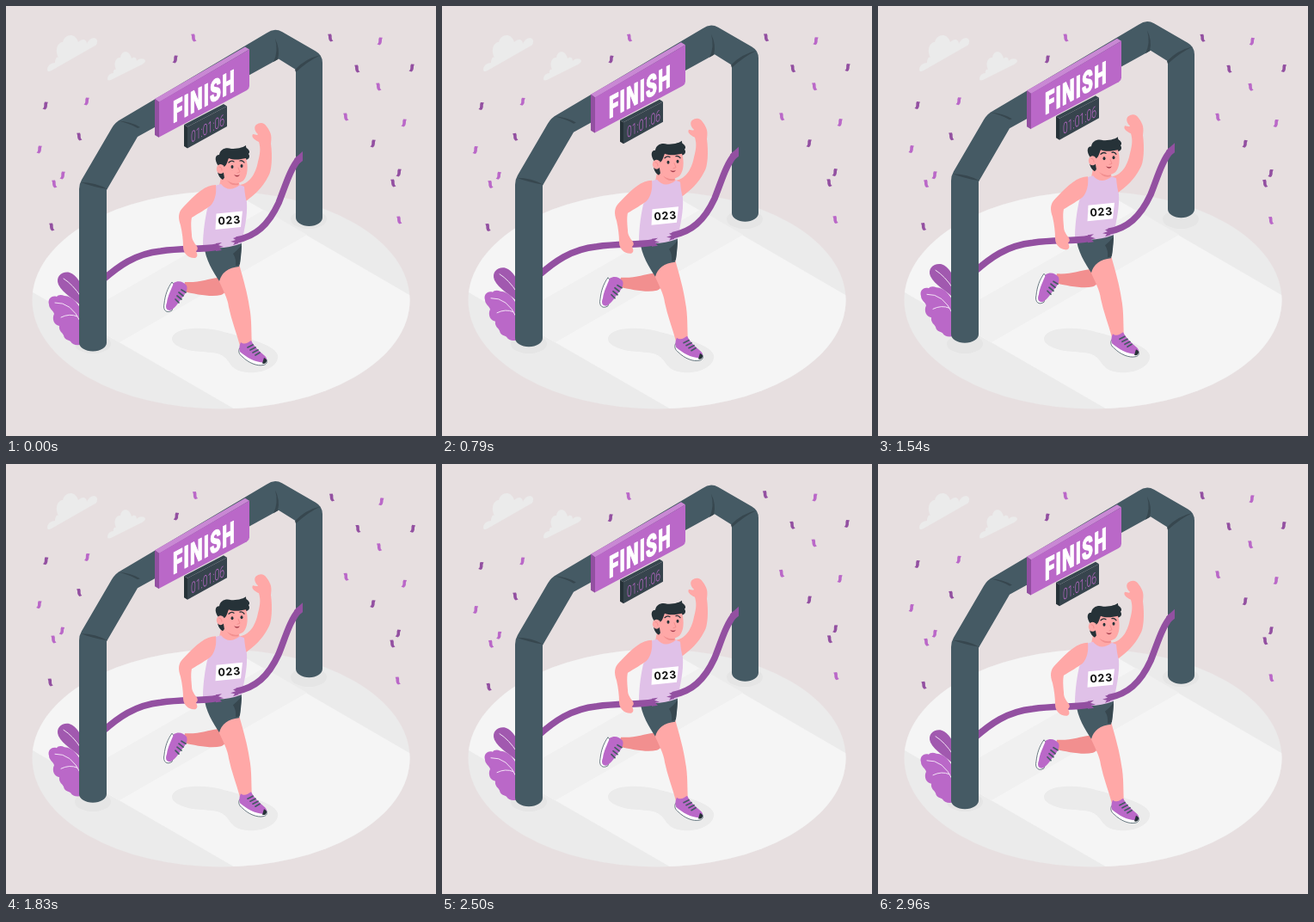
An HTML page for the animation above (3 s loop, 500x500 px).

```html
<!DOCTYPE html>
<html lang="en">
<head>
<meta charset="utf-8">
<title>Finish line</title>
<style>
html, body { margin: 0; width: 100%; height: 100%; overflow: hidden; background: #e7dfe0; }
svg { display: block; width: 100%; height: 100%; }
.skin { fill: #ffa8a7; }
.steel { fill: #455a64; }
.dark { fill: #37474f; }
.ink { fill: #263238; }
.lilac { fill: #ba68c8; }
.plum { fill: #9350a1; }
.line { fill: none; stroke-linecap: round; stroke-linejoin: round; }
.rope { fill: none; stroke: #9350a1; stroke-width: 7.6; }
text { text-anchor: middle; }
</style>
</head>
<body>
<svg viewBox="0 0 500 500">
  <defs>
    <clipPath id="disc"><ellipse cx="250" cy="342" rx="219.5" ry="126.5"/></clipPath>
  </defs>

  <!-- Ground -->
  <g clip-path="url(#disc)">
    <rect y="200" width="500" height="300" fill="#ebebeb"/>
    <path fill="#f5f5f5" d="M0 315L320 500H500V354L240 203H0Z"/>
    <path fill="#f0f0f0" d="M82 362L132 391L350 266L300 237Z"/>
  </g>
  <g fill="#e5e5e5">
    <ellipse cx="101" cy="393" rx="21" ry="11"/>
    <ellipse cx="352" cy="248" rx="21" ry="11"/>
  </g>
  <path fill="#ebebeb" d="M193 386C196 374 225 372 250 378C270 384 312 392 316 406C318 418 300 428 280 426C262 424 262 416 255 409C245 400 230 404 212 400C200 397 192 392 193 386Z"/>

  <!-- Clouds -->
  <g fill="#ebebeb">
    <path d="M48 74C48 70 52 66 57 66C57 62 59 58 61 60C56 50 61 42 66 42C68 33 80 30 84 42C90 36 94 40 94 44C98 35 107 36 106 42C106 45 104 46 102 47L53 75C50 77 48 76 48 74Z"/>
    <path d="M118 85C118 81 121 78 125 78C124 75 126 73 128 74C124 65 129 59 133 60C134 52 143 50 146 61C150 58 152 61 152 64C154 61 161 60 162 64C161 67 158 68 156 69L122 86C119 87 118 86 118 85Z"/>
  </g>

  <g id="confetti"></g>

  <g id="float">
    <!-- Plant -->
    <path fill="#a159af" d="M90 352C80 340 66 335 61 324C57 314 66 308 74 310C82 312 88 324 91 332Z"/>
    <path class="lilac" d="M90 360C86 348 78 337 68 337C64 335 60 336 59 338C53 336 48 341 50 347C50 352 55 354 56 358C53 364 56 371 62 372C61 378 66 380 67 383C68 388 72 388 75 390C78 395 84 395 90 393Z"/>
    <path class="line" stroke="#f3e3f6" d="M67 317Q78 324 87 338M57 345Q76 344 87 368M64 362Q74 357 83 361"/>

    <!-- Raised arm -->
    <path class="skin" d="M272 208C285 206 291 192 293 181C296 170 296 165 294 158C288 155 285 152 287 149C290 149 292 151 293 149C289 146 288 140 291 138C295 135 300 135 303 140C309 148 309 152 308 160C310 175 309 192 305 198C298 212 288 220 279 227Z"/>

    <!-- Legs -->
    <path fill="#f28f8f" d="M208 321C225 322 235 317 246 316C258 320 260 332 250 336C238 339 222 335 205 332Z"/>
    <path class="skin" d="M246 316C252 330 258 340 259 350C262 365 268 380 272 395L286 394C285 380 286 365 283 350C281 335 276 318 271 300L250 304Z"/>
    <g id="backShoe">
      <path fill="#fff" stroke="#455a64" stroke-width=".8" d="M193 321C188 328 185 336 184 346C182 354 187 358 193 354L200 330Z"/>
      <path class="lilac" d="M195 322C200 319 206 320 210 325C212 330 208 336 204 340C200 346 196 352 191 354C186 354 185 350 187 345C188 337 192 330 195 322Z"/>
      <path class="line" stroke="#455a64" stroke-width="1.7" d="M204 330L209 333M201 333L206 337M199 337L204 341M197 341L201 345"/>
    </g>
    <g id="frontShoe">
      <path fill="#fff" stroke="#455a64" stroke-width=".8" d="M271.500 398C270 402 271 405 275 408C282 415 292 419 299 417.500C303 417 304 414 303 411Z"/>
      <path class="lilac" d="M273 391C277 394 281 392 285 389C288 395 294 401 300 406C305 410 304 414.500 298 414.500C290 414 280 409 272 402C271 399 271 395 273 391Z"/>
      <path class="ink" d="M300 409Q305 411 302 415Q300 416.500 298 415.500Z"/>
      <path class="line" stroke="#455a64" stroke-width="1.700" d="M281 397L287 394M284 400L290 397M287 403L293 400M290 406L295 403"/>
    </g>

    <!-- Shorts and shirt -->
    <path class="steel" d="M230 277Q252 281 274 273C274 285 273 296 271 303Q252 305 248 320C241 309 232 296 230 277Z"/>
    <path class="dark" d="M264 288Q269 284 274 278L272 300Q270 302 267 302Q268 294 264 288Z"/>
    <path class="skin" d="M251 194L270 204L273 211Q261 220 248 209Z"/>
    <path fill="#f28f8f" d="M256 201Q263 208 271 206L270 208Q261 210 256 201Z"/>
    <path fill="#e0c1e8" d="M243 209L250 207Q259 218 272 208L277 210Q278 222 280 228C281 245 277 260 274 276Q250 285 229 279C229 262 232 245 234 236Q241 225 243 209Z"/>
    <path fill="#fff" d="M244.500 241.500L275 238.500L273 257L243.500 260Z"/>
    <text transform="translate(260 253.500) rotate(-4)" font-family="Inter, sans-serif" font-weight="700" font-size="12.500" letter-spacing=".8" fill="#111">023</text>

    <!-- Head -->
    <path class="ink" d="M252 202C246 198 245 192 247 186C242 179 243 173 248 173C249 166 256 164 262 166C268 166 275 165 279 162C279 164 279 165 281 166C283 168 284 170 282 172C285 176 281 180 276 179L262 190Z"/>
    <path class="skin" d="M252 188C257 186 257 181 259 177C266 180 273 178 279 177C282 186 281 198 276 203C270 208 260 207 254 200Z"/>
    <ellipse class="skin" cx="249.500" cy="189.500" rx="4.700" ry="5.500"/>
    <path class="line" stroke="#f28f8f" d="M248 187Q251 187 251 191M270 188L272 193L269 194"/>
    <ellipse class="ink" cx="263" cy="187" rx="1.500" ry="2"/>
    <ellipse class="ink" cx="274" cy="186" rx="1.500" ry="2"/>
    <path class="line" stroke="#263238" stroke-width="1.300" d="M259 182Q262 179 265 181M272 180Q275 179 277 182"/>
    <path fill="#a33d4c" d="M265 196Q269 198 272 196Q269 201 265 196Z"/>

    <!-- Left half of the ribbon, then the arm that crosses it -->
    <path class="rope" d="M112 319C130 303 150 288 180 285C206 281 226 284 246 280"/>
    <path class="plum" d="M244 276L251 275L247 278L253 280L248 281L251 284L244 285Z"/>
    <path class="skin" d="M244 208C232 208 222 217 206 234C200 240 200 246 203 255C205 264 206 272 206 280C206 288 213 294 220 293C224 291 222 288 221 285C224 283 223 280 220 277C217 272 216 270 216 266C215 256 215 250 216 246C224 241 233 236 238 232C243 226 245 218 244 208Z"/>

    <!-- Arch -->
    <path class="steel" d="M85 391V213Q85 207 88 202L123 142Q127 135 134 131.500L303 31.500Q312 25 321 30L360 52.500Q368 57 368 66V246A15.500 10 0 0 1 337 246V74L317 61.500L153 152L117 214V391.500A16 10 0 0 1 85 391.500Z"/>
    <path class="dark" d="M87 205Q104 205 118 213Q100 210 87 205ZM130 133.500Q145 134 156 141L153 142Q143 136 130 133.500ZM313 38Q319 50 316 62L311 65Q317 53 313 38ZM336 74Q348 61 366 57Q351 64 337 77Z"/>

    <!-- Sign -->
    <path fill="#c988d4" d="M173 108L278 47.500L283 50.500L178 112Z"/>
    <path class="plum" d="M173 108L178 111.500V153L173 150Z"/>
    <path class="lilac" d="M178 111.500L283 50.500V93Q283 96 280 98L178 152.500Z"/>
    <text transform="matrix(.59 -.312 0 1 230.500 117)" font-family="Roboto, sans-serif" font-weight="900" font-size="35" letter-spacing="2" fill="#fff" stroke="#fff" stroke-width="1.200" stroke-linejoin="round">FINISH</text>

    <!-- Clock -->
    <path class="dark" d="M207 138L253 114L257 116.500L211 140.500Z"/>
    <path class="ink" d="M207 138L211 140.500V165.500L207 163Z"/>
    <path fill="#37444d" d="M211 140.500L257 116.500V140L211 165.500Z"/>
    <text transform="matrix(.58 -.308 0 1 234.500 148.500)" font-family="Roboto, sans-serif" font-weight="300" font-size="18" fill="#ba68c8">01:01:06</text>

    <!-- Right half of the ribbon -->
    <path class="rope" d="M268 272C290 268 305 255 317 229C325 209 330 190 341 177"/>
    <path class="plum" d="M270 268L264 270L267 272L261 274L266 275L264 278L270 276ZM335 178L345 169V180L340 184Z"/>
  </g>
</svg>
<script>
// Confetti: x, y, per piece; d = dark, l = light, capital letter = mirrored.
const pieces = {
  d: [[46, 116], [197, 62], [472, 72], [427, 160], [457, 194]],
  D: [[85, 152], [53, 257], [377, 37], [408, 73], [450, 206]],
  l: [[94, 111], [39, 167], [66, 197], [435, 41], [463, 136]],
  L: [[56, 207], [218, 37], [433, 94], [395, 129], [457, 249]]
};
const confetti = document.getElementById('confetti');
const float = document.getElementById('float');

confetti.innerHTML = Object.entries(pieces).map(([kind, spots]) => {
  const tone = kind.toLowerCase() === 'd' ? 'plum' : 'lilac';
  const flip = kind === kind.toLowerCase() ? 1 : -1;
  return spots.map(([x, y]) =>
    `<path class="${tone}" transform="translate(${x} ${y}) scale(${flip} 1)"
      d="M-1 -4.500L2.800 -4.200Q1.500 -1.500 1.800 1Q1.500 3.500 -.5 4.500L-3.500 3.500Q-1.500 2 -1.700 0Q-2 -3 -1 -4.500Z"/>`
  ).join('');
}).join('');

// Linear wave: 0 at phase 0, 1 at .25, -1 at .75.
const wave = p => p < .25 ? 4 * p : p < .75 ? 2 - 4 * p : 4 * p - 4;

function draw() {
  const t = performance.now() % 3000 / 3000;
  const lift = 10 * (1 - Math.abs(1 - 2 * t));
  float.setAttribute('transform', `translate(0 ${-lift})`);
  confetti.setAttribute('transform', `rotate(${wave(2 * t % 1)} 255 147)`);
  requestAnimationFrame(draw);
}
draw();
</script>
</body>
</html>
```
